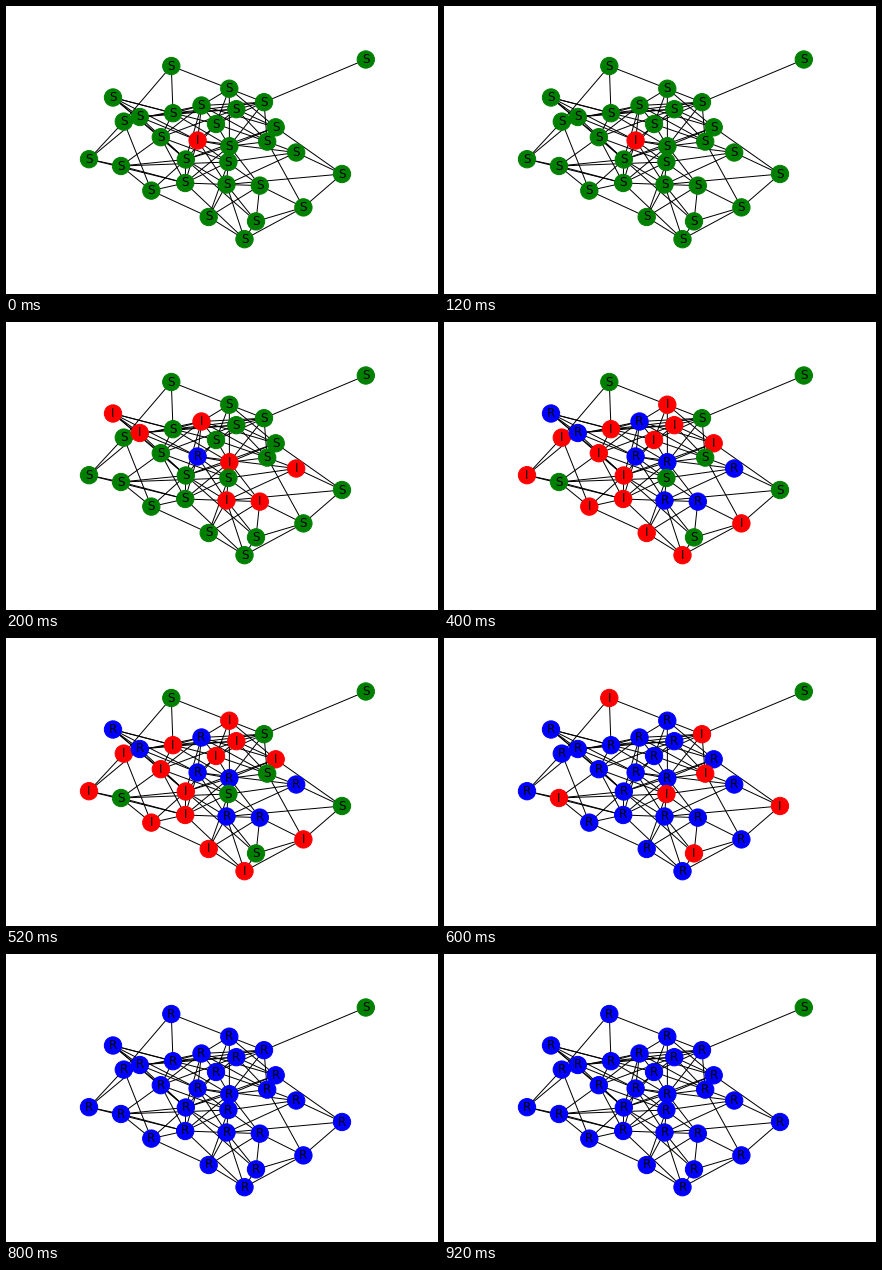
Write a matplotlib script that moves like this. It is 432 px wide and 288 px high and loops after 1 s.

```python
import matplotlib.pyplot as plt
from matplotlib.animation import FuncAnimation
from matplotlib.collections import LineCollection

WIDTH, HEIGHT, DPI = 432, 288, 72
STEPS, STEP_MS = 5, 200
NEVER = STEPS
COLORS = {"S": "green", "I": "red", "R": "blue"}

# (x, y, step at which the node becomes infected)
NODES = [
    (165.3, 60, 3), (359.8, 53.5, NEVER), (107, 91.5, 1), (117.8, 115.6, 2),
    (133.8, 111, 1), (167, 107.2, 2), (195.5, 99.5, 1), (223.3, 82.7, 2),
    (230.3, 103.2, 2), (258, 96.2, 3), (210, 118, 2), (269.7, 121.3, 2),
    (261.2, 135.6, 3), (154.8, 131.2, 2), (191.6, 134.5, 0), (223.4, 140.2, 1),
    (290.2, 146.5, 1), (179.8, 153.5, 2), (222.4, 156, 3), (83, 153.2, 2),
    (115, 160, 3), (145.3, 184.6, 2), (179.2, 177, 2), (220.5, 178.5, 1),
    (253.8, 179.6, 1), (336, 168, 3), (297.4, 201.4, 2), (250, 215.4, 3),
    (202.7, 211, 2), (238.5, 233.2, 2),
]

LINKS = {
    0: [3, 5, 7],
    1: [9],
    2: [4, 5, 10, 13, 14, 17],
    3: [6, 19, 21],
    4: [5, 8, 14, 17, 19],
    5: [6, 8, 9, 13, 15],
    6: [7, 9, 10, 11, 12, 13, 14, 17],
    7: [9, 10, 11, 15],
    8: [9, 11, 12, 13, 14],
    9: [10, 12, 15],
    10: [12, 15, 17],
    11: [12, 15, 17, 25],
    12: [15, 16, 26],
    13: [17, 18, 20, 22],
    14: [15, 16, 22, 23, 24],
    15: [17, 18, 22, 23, 24],
    16: [23, 25],
    17: [20, 21, 22, 23, 27],
    18: [16, 22, 28],
    19: [20, 22],
    20: [21, 22, 18],
    21: [22, 28],
    22: [23, 29],
    23: [24, 25, 27, 28, 29],
    24: [26, 27, 28],
    25: [26],
    26: [27, 29],
    27: [29],
    28: [29],
}

points = [(x, y) for x, y, _ in NODES]

fig = plt.figure(figsize=(WIDTH / DPI, HEIGHT / DPI), dpi=DPI, facecolor="white")
ax = fig.add_axes([0, 0, 1, 1])
ax.set(xlim=(0, WIDTH), ylim=(HEIGHT, 0))
ax.axis("off")

ax.add_collection(LineCollection(
    [(points[a], points[b]) for a, ends in LINKS.items() for b in ends],
    colors="black", linewidths=1, zorder=1))
dots = ax.scatter(*zip(*points), s=300, linewidths=1, zorder=2)
labels = [ax.text(x, y, "", ha="center", va="center", fontsize=12,
                  family="DejaVu Sans", zorder=3) for x, y in points]


def state(infected_at, step):
    if step < infected_at:
        return "S"
    return "I" if step == infected_at else "R"


def draw(step):
    states = [state(infected_at, step) for _, _, infected_at in NODES]
    colors = [COLORS[s] for s in states]
    dots.set_facecolor(colors)
    dots.set_edgecolor(colors)
    for label, s in zip(labels, states):
        label.set_text(s)
    return [dots, *labels]


anim = FuncAnimation(fig, draw, frames=STEPS, interval=STEP_MS, repeat=True)
plt.show()
```
